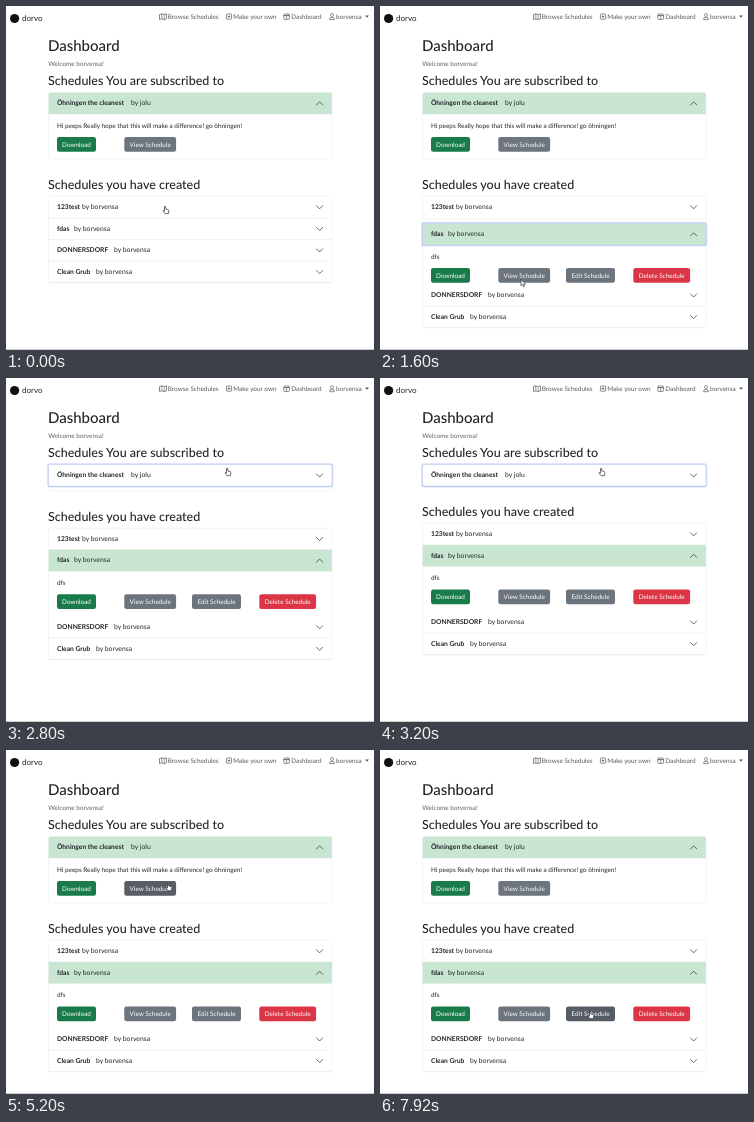
These frames come from a looping animation (368x344 px, 8 s). An HTML page with a canvas:

```html
<!DOCTYPE html>
<html lang="en">
<head>
<meta charset="utf-8">
<title>Dashboard</title>
<style>
html, body { margin: 0; width: 100%; height: 100%; overflow: hidden; background: #fff; }
canvas { display: block; }
</style>
</head>
<body>
<canvas id="stage" width="368" height="344"></canvas>
<script>
const ctx = document.getElementById('stage').getContext('2d');
const LOOP = 8000, LEFT = 42.5, WIDTH = 283.5, HEAD = 21.6, BODY = 45;
const INK = '#212529', BORDER = '#e4e7ea', GREEN = '#c9e6d3';
const USER = 'borvensa', FRIEND = 'jolu', BRAND = 'dorvo';

// Each event is [time, value]; focus and open states fade between them.
const panels = {
  top: {
    title: 'Öhningen the cleanest', by: FRIEND, byX: 125, slide: 255, start: 1,
    text: 'Hi peeps Really hope that this will make a difference! go öhningen!',
    opens: [[2645, 0], [3200, 1]], focus: [[2290, 1], [4440, 0]], buttons: 2
  },
  list: [
    { title: '123test', byX: 76, text: 'test', opens: [[40, 1], [1395, 0]], focus: [[30, 1], [930, 0]] },
    { title: 'fdas', byX: 68, text: 'dfs', opens: [[1395, 1]], focus: [[930, 1], [2290, 0]] },
    { title: 'DONNERSDORF', byX: 108 },
    { title: 'Clean Grub', byX: 90 }
  ]
};

const buttons = [
  ['Download', 51, 39, '#197b4a', '#157347'],
  ['View Schedule', 118.3, 51.8, '#6c757d', '#565d64'],
  ['Edit Schedule', 186, 49, '#6c757d', '#565d64'],
  ['Delete Schedule', 253.3, 56.8, '#dc3545', '#bb2d3b']
];

const cursorPath = [
  [0, 160, 204], [400, 160, 204], [900, 143, 277], [1650, 143, 277],
  [2230, 222, 94], [4170, 222, 94], [4330, 145, 138], [4980, 145, 138],
  [5200, 163, 137], [6560, 163, 137], [6640, 145, 196], [7400, 148, 263],
  [7450, 150, 263], [7600, 211, 265]
];

const clamp = v => Math.max(0, Math.min(1, v));
const smooth = v => { v = clamp(v); return v * v * (3 - 2 * v); };
const bezier = (s, a, b) => 3 * s * (1 - s) ** 2 * a + 3 * s * s * (1 - s) * b + s ** 3;

// CSS "ease": cubic-bezier(.25, .1, .25, 1)
function ease(x) {
  if (x <= 0 || x >= 1) return clamp(x);
  let lo = 0, hi = 1;
  for (let i = 0; i < 16; i++) {
    const mid = (lo + hi) / 2;
    if (bezier(mid, .25, .25) < x) lo = mid; else hi = mid;
  }
  return bezier(lo, .1, 1);
}

function ramp(t, events = [], duration, value = 0, curve = smooth) {
  for (const [at, target] of events) value += (target - value) * curve((t - at) / duration);
  return value;
}

function cursorAt(t) {
  const i = cursorPath.findIndex(p => p[0] > t);
  if (i < 0) return cursorPath.at(-1).slice(1);
  const [a, b] = [cursorPath[i - 1], cursorPath[i]];
  const k = smooth((t - a[0]) / (b[0] - a[0]));
  return [a[1] + (b[1] - a[1]) * k, a[2] + (b[2] - a[2]) * k];
}

// Precise rendering keeps the tiny type free of hinting distortion.
function text(str, x, y, size = 6.4, color = INK, weight = 400, align = 'left') {
  ctx.font = `${weight} ${size}px Lato, sans-serif`;
  ctx.textRendering = 'geometricPrecision';
  ctx.fillStyle = color;
  ctx.textAlign = align;
  ctx.fillText(str, x, y);
}

const heading = (str, y, size = 12.5) => text(str, 42, y, size, INK, 500);

function box(x, y, w, h, r, fill, stroke, line = .5) {
  ctx.beginPath();
  ctx.roundRect(x, y, w, h, r);
  if (fill) { ctx.fillStyle = fill; ctx.fill(); }
  if (stroke) { ctx.strokeStyle = stroke; ctx.lineWidth = line; ctx.stroke(); }
}

function lines(points, color, width) {
  ctx.beginPath();
  points.forEach(([x, y], i) => i ? ctx.lineTo(x, y) : ctx.moveTo(x, y));
  ctx.strokeStyle = color;
  ctx.lineWidth = width;
  ctx.stroke();
}

function rule(y) { lines([[LEFT, y], [LEFT + WIDTH, y]], BORDER, .6); }

function chevron(x, y, turn) {
  ctx.save();
  ctx.translate(x, y);
  ctx.rotate(-Math.PI * turn);
  ctx.lineJoin = ctx.lineCap = 'round';
  lines([[-3.1, -1.5], [0, 1.6], [3.1, -1.5]], '#33383c', .75);
  ctx.restore();
}

const inside = (p, x, y, w, h) => p[0] >= x && p[0] <= x + w && p[1] >= y && p[1] <= y + h;

function button([label, x, w, color, dark], y, pointer) {
  const hover = inside(pointer.at, x, y, w, 15);
  if (hover) pointer.hand = true;
  box(x, y, w, 14.8, 2.2, hover ? dark : color);
  text(label, x + w / 2, y + 9.7, 6.4, '#fff', 400, 'center');
}

// Draws one accordion entry and returns the y below it.
function panel(p, y, t, pointer, rings) {
  const start = p.start || 0;
  const open = ramp(t, p.opens, p.slide || 350, start, ease);
  const active = ramp(t, p.opens, 150, start);
  const focus = ramp(t, p.focus, 150);
  const bodyY = y + HEAD, height = BODY * open;
  if (inside(pointer.at, LEFT, y, WIDTH, HEAD)) pointer.hand = true;

  ctx.globalAlpha = active;
  box(LEFT, y, WIDTH, HEAD, p.start ? [2.4, 2.4, 0, 0] : 0, GREEN);
  ctx.globalAlpha = 1;
  text(p.title, 51, y + 12.6, 6.7, INK, 700);
  text('by ' + (p.by || USER), p.byX, y + 12.6, 6.8);
  chevron(313.6, y + 10.9, ramp(t, p.opens, 150, start));

  if (height > .1) {
    ctx.save();
    ctx.beginPath();
    ctx.rect(LEFT, bodyY, WIDTH, height);
    ctx.clip();
    rule(bodyY);
    text(p.text, 51, bodyY + 13.5);
    buttons.slice(0, p.buttons || 4).forEach(b => button(b, bodyY + 22.9, pointer));
    ctx.restore();
  } else {
    rule(bodyY);
  }
  if (focus > .01) rings.push([y, focus]);
  return bodyY + height;
}

function focusRing([y, strength]) {
  ctx.globalAlpha = strength;
  box(LEFT - .6, y - .6, WIDTH + 1.2, HEAD + 1.2, 2.2, null, 'rgba(60,110,225,.24)', 1.4);
  box(LEFT, y, WIDTH, HEAD, 1.8, null, '#b6cbee', .4);
  ctx.globalAlpha = 1;
}

function navigation(shift) {
  const gray = '#55595c';
  ctx.beginPath();
  ctx.arc(8.6, 12.5, 4.6, 0, 7);
  ctx.fillStyle = '#111';
  ctx.fill();
  text(BRAND, 16, 15, 8);

  ctx.save();
  ctx.translate(-shift, 0);
  text('Browse Schedules', 161.8, 13, 6.4, gray);
  text('Make your own', 227.2, 13, 6.4, gray);
  text('Dashboard', 285.2, 13, 6.4, gray);
  text(USER, 330, 13, 6.4, gray);
  lines([[153.5, 8.6], [155.8, 7.8], [158.2, 8.6], [160.5, 7.8], [160.5, 12.8],
    [158.2, 13.6], [155.8, 12.8], [153.5, 13.6], [153.5, 8.6]], gray, .7);
  lines([[155.8, 7.8], [155.8, 12.8]], gray, .6);
  lines([[158.2, 8.6], [158.2, 13.6]], gray, .6);
  box(220.4, 8, 5.2, 5.2, .7, null, gray, .7);
  lines([[221.6, 10.6], [224.4, 10.6]], gray, .7);
  lines([[223, 9.2], [223, 12]], gray, .7);
  box(277.8, 8, 5.6, 5.4, .7, null, gray, .7);
  lines([[277.8, 9.6], [283.4, 9.6]], gray, .9);
  lines([[280.6, 9.6], [280.6, 13.4]], gray, .6);
  ctx.beginPath();
  ctx.arc(326, 9, 1.5, 0, 7);
  ctx.stroke();
  box(323.6, 11.5, 4.8, 2.2, [1.6, 1.6, .4, .4], null, gray, .7);
  ctx.beginPath();
  ctx.moveTo(359, 9.6);
  ctx.lineTo(363, 9.6);
  ctx.lineTo(361, 11.8);
  ctx.fillStyle = gray;
  ctx.fill();
  ctx.restore();
}

function dashboard(t, pointer) {
  const rings = [];
  heading('Dashboard', 44.6, 15);
  text('Welcome ' + USER + '!', 42.3, 60, 6.4, '#5d6267');
  heading('Schedules You are subscribed to', 79.3);

  const top = 86.5;
  const end = panel(panels.top, top, t, pointer, rings);
  box(LEFT, top, WIDTH, end - top, 2.4, null, BORDER);

  heading('Schedules you have created', end + 30.2);
  const listTop = end + 37.2;
  let y = listTop;
  for (const p of panels.list) y = panel(p, y, t, pointer, rings);
  box(LEFT, listTop, WIDTH, y - listTop, 2.4, null, BORDER);
  rings.forEach(focusRing);
}

function schedulePage(pointer) {
  heading(panels.top.title, 44.6, 15);
  text('by ' + FRIEND, 42.3, 60, 6.4, '#5d6267');
  text(panels.top.text, 42.3, 74);
  button(['Download', 42.3, 39, '#197b4a', '#157347'], 84, pointer);
  box(362, 0, 6, 343, 0, '#f1f1f1');
  box(363, 3, 4, 200, 2, '#c1c1c1');
}

function drawCursor({ at: [x, y], hand }) {
  ctx.save();
  ctx.translate(x, y);
  ctx.lineJoin = 'round';
  ctx.beginPath();
  const shape = hand
    ? [[-1.5, -3.6], [-.4, -3.6], [-.2, -1], [2.4, -.4], [2.9, .4], [2.3, 3.7], [-1, 3.7], [-3, .9], [-2.5, .2], [-1.5, 1]]
    : [[-2, -3.6], [-2, 2.8], [-.5, 1.5], [.5, 3.7], [1.5, 3.2], [.6, 1.2], [2.5, 1.1]];
  shape.forEach(p => ctx.lineTo(...p));
  ctx.closePath();
  ctx.fillStyle = '#fff';
  ctx.fill();
  ctx.strokeStyle = '#333';
  ctx.lineWidth = .7;
  ctx.stroke();
  ctx.restore();
}

function draw(t) {
  const pointer = { at: cursorAt(t), hand: false };
  const viewing = t >= 5360 && t < 6000;
  ctx.fillStyle = '#fff';
  ctx.fillRect(0, 0, 368, 344);
  navigation(viewing ? 6 : 0);
  if (viewing) schedulePage(pointer); else dashboard(t, pointer);
  ctx.fillStyle = '#cfcfcf';
  ctx.fillRect(0, 343, 368, 1);
  drawCursor(pointer);
}

const began = performance.now();
function tick() {
  draw((performance.now() - began) % LOOP);
  requestAnimationFrame(tick);
}
tick();
</script>
</body>
</html>
```
